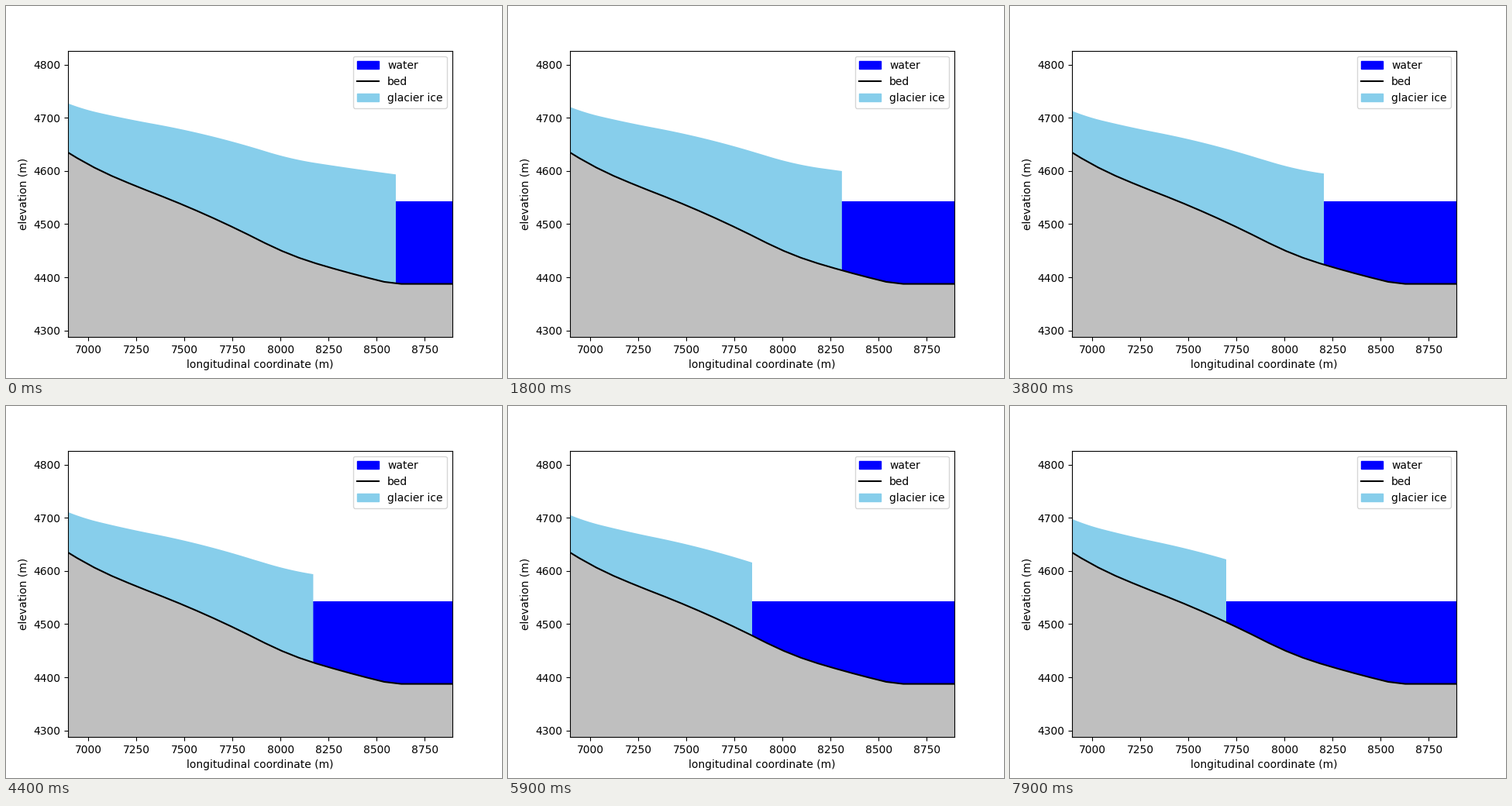
These frames come from a looping animation (640 px wide and 480 px high, 8000 ms). A matplotlib script:

```python
import matplotlib.pyplot as plt
import numpy as np
from matplotlib.animation import FuncAnimation
from matplotlib.patches import Patch, Polygon

FRAMES, INTERVAL = 80, 100
LEFT, RIGHT, BOTTOM = 80, 576, 427.2      # axes edges in stage pixels
X0, X1 = 6893.7, 8893.7
Y0, Y1 = 4287.5, 4826.4
ICE, WATER, ROCK = "skyblue", "blue", "0.75"


def to_x(px):
    """Stage pixel to longitudinal coordinate in metres."""
    return X0 + (px - LEFT) * (X1 - X0) / (RIGHT - LEFT)


def to_y(px):
    """Stage pixel (downwards) to elevation in metres."""
    return Y0 + (BOTTOM - px) * (Y1 - Y0) / 369.6


def keyed(*keys):
    """Function running linearly through a few key points."""
    xs, ys = zip(*keys)
    return lambda x: np.interp(x, xs, ys)


def profile(start, slope):
    """Height curve from its value at the left edge and its slope."""
    x = np.arange(LEFT, RIGHT + 1)
    s = slope(x)
    y = start + np.append(0, np.cumsum((s[1:] + s[:-1]) / 2))
    return lambda px: np.interp(px, x, y)


bed = profile(189, keyed((80, .63), (140, .43), (190, .385), (330, .51),
                         (400, .3), (488, .24), (510, 0)))
surface = profile(125.7, keyed((80, .38), (120, .225), (190, .18),
                               (335, .31), (400, .155), (503, .13)))

# Lowering of the surface in pixels per second, and front position over time
thinning = keyed((80, 2.55), (320, 3.5), (400, 3.4), (503, 2.6))
front = keyed((0, 503), (.5, 495), (1, 469), (2.3, 407), (2.6, 403),
              (3.8, 405), (4.5, 395), (4.8, 353), (5, 335), (5.9, 315),
              (7.9, 279))

fig, ax = plt.subplots(figsize=(6.4, 4.8), dpi=100)
ax.set(xlim=(X0, X1), ylim=(Y0, Y1),
       xlabel="longitudinal coordinate (m)", ylabel="elevation (m)")

nodes = np.r_[LEFT, np.arange(92, RIGHT, 22), RIGHT]
bed_x, bed_y = to_x(nodes), to_y(bed(nodes))

ax.fill_between([X0, X1], Y0, to_y(252), color=WATER, lw=0, zorder=1)
ice = ax.add_patch(Polygon([(X0, Y0)], color=ICE, lw=0, zorder=1.1))
ax.fill_between(bed_x, Y0, bed_y, color=ROCK, lw=0, zorder=1.2)
line, = ax.plot(bed_x, bed_y, color="black", label="bed", zorder=2)
ax.legend(handles=[Patch(color=WATER, label="water"), line,
                   Patch(color=ICE, label="glacier ice")],
          loc="upper right")


def update(i):
    t = i * INTERVAL / 1000
    px = np.linspace(LEFT, front(t), 150)
    top = np.column_stack([to_x(px), to_y(surface(px) + thinning(px) * t)])
    ice.set_xy(np.vstack([top, (top[-1, 0], Y0), (X0, Y0)]))
    return ice,


anim = FuncAnimation(fig, update, frames=FRAMES, interval=INTERVAL,
                     init_func=lambda: update(0), repeat=True, repeat_delay=0)
plt.show()
```
